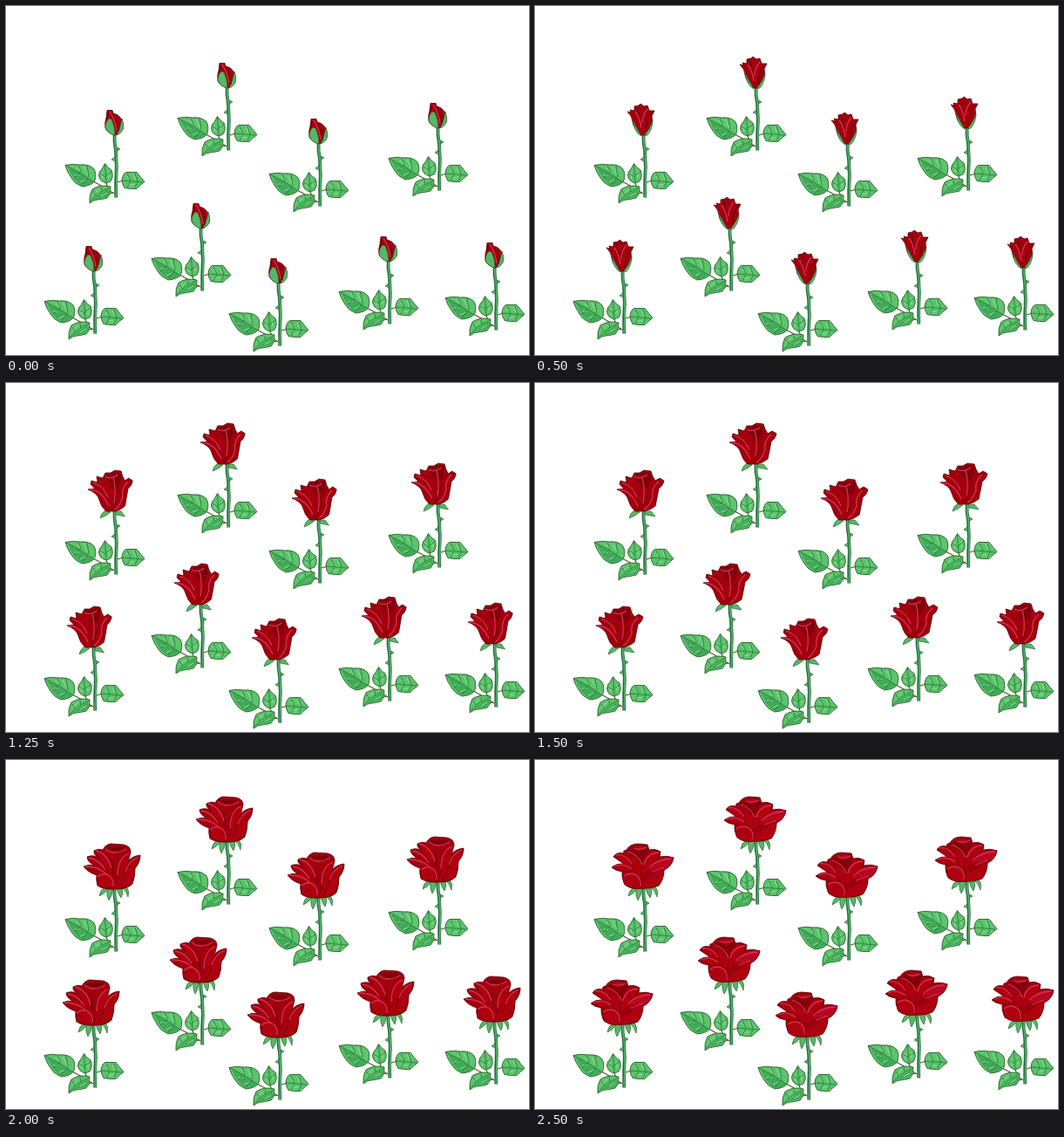
Recreate the animation shown at these times as an HTML page with a canvas. Size 600x400 px, loop 5 s.

```html
<!DOCTYPE html>
<html lang="en">
<head>
<meta charset="utf-8">
<title>Blooming roses</title>
<style>
html, body { margin: 0; width: 100%; height: 100%; overflow: hidden; background: #fff; }
canvas { display: block; width: 600px; height: 400px; }
</style>
</head>
<body>
<canvas id="stage" width="600" height="400"></canvas>
<script>
const ctx = document.getElementById('stage').getContext('2d');
const LOOP = 5000, STEP = 250;

// Plant positions relative to the top one, whose coordinates the paths use.
const PLANTS = [[0, 0], [-129, 54], [105, 64], [242, 46], [-30, 161],
  [-153, 210], [59, 224], [185, 199], [307, 206]];

// Each style: fill, stroke, line width.
const STYLES = {
  leaf: ['#5cc46c', '#2a5e26', 0.9],
  shade: ['#41aa58', null, 0],
  glow: [null, '#92e09a', 1],
  vein: [null, '#23743a', 0.8],
  twig: [null, '#4f5a20', 1.2],
  bark: [null, '#20683a', 3.8],
  sap: [null, '#52b46c', 1.7],
  sepal: ['#56b866', '#2a6634', 0.7],
  red: ['#a2000c', '#5a000a', 0.8],
  deep: ['#86000a', null, 0],
  petal: ['#ae000e', '#74000e', 0.7],
  rose: ['#b6081e', '#74000e', 0.7],
  pink: [null, '#d83056', 1.3],
  dark: [null, '#62000a', 1]
};

const STALK = [
  ['twig', 'M229 147Q241 153 253 161M241 163L252 160M243 147L247 156M257 148L264 146'],
  ['leaf', 'M197 128.5Q206 126.5 214 128Q225 127 230 133Q233 138 231 146Q228 152 216 153Q207 149 204 143Q199 136 197 128.5Z'],
  ['shade', 'M200 130Q215 138 229 147Q225 152 216 152Q206 146 200 130Z'],
  ['glow', 'M210 131L217 137M218 130L223 140M207 140L213 140M214 148L221 145'],
  ['vein', 'M198 129Q216 137 230 148M212 129L216 137M222 129L224 142M207 143L214 137M216 151L223 143'],
  ['leaf', 'M242.5 126.5Q245 131 250 134Q253 141 249 147L244 149Q236 147 235.5 140Q236 135 239 133Z'],
  ['glow', 'M239 137L240 144M247 136L247 143'],
  ['vein', 'M242.5 128L244 148M237 138L243 142M250 136L244 140'],
  ['leaf', 'M225 172Q224 163 228 156Q237 150 249 153Q249 162 245 166Q237 168 234 168Q230 168 225 172Z'],
  ['shade', 'M227 169L247 155Q248 162 244 165Q234 166 227 169Z'],
  ['glow', 'M229 162L236 156M238 164L245 160'],
  ['vein', 'M226 170Q233 161 248 154M229 158L232 163M238 154L239 159'],
  ['leaf', 'M262 145Q263 138 267 136.5L279 136.5Q284 143 288 147.5Q283 151 279 155.5Q271 156 265 154.5Q262 150 262 145Z'],
  ['glow', 'M267 141L271 144M275 139L278 145M269 151L276 151'],
  ['vein', 'M262 146L286 148M268 138L272 146M277 138L280 147M268 154L272 147M277 154L280 148'],
  ['bark', 'M253.5 92Q253 102 255 112Q256.5 130 255.2 147L255.2 165.5'],
  ['sap', 'M253.7 93Q253.3 102 255.3 112Q256.8 130 255.3 165'],
  ['sepal', 'M256.5 108L260 110L256.5 112ZM254 119L250 122L254.5 124Z']
];

const BUD = [
  ['red', 'M245 65.5L251 65.5L252 69Q258 70 261 75Q264 80 263 87Q260 93 254 94Q246 92 243 86Q242 79 244 74Z'],
  ['sepal', 'M247 75Q243 79 243 85Q245 92 254 94Q254 84 250 76Z'],
  ['sepal', 'M262 75Q265 82 263 88Q260 93 256 94Q260 87 262 75Z'],
  ['pink', 'M248 67Q254 76 256 89'],
  ['dark', 'M252 70Q259 79 258 90M246 68L245 75']
];

const OPENING = [
  ['red', 'M235 67L239 68L238 65L243 66L243 61L248 60L250 58L254 61L258 60L260 66L266 66L263 72Q265 80 261 87L256 94L250 94Q242 86 241 79Q241 73 235 67Z'],
  ['sepal', 'M241 77Q246 87 251 95Q243 91 241 77Z'],
  ['sepal', 'M264 77Q264 87 258 94L254 95Q261 87 264 77Z'],
  ['dark', 'M247 62Q247 70 250 76M262 68Q257 75 256 90'],
  ['pink', 'M244 67Q249 73 251 86M258 64Q252 71 252 80']
];

const CUP = [
  ['sepal', 'M233 87Q240 86 250 94Q240 96 233 87Z'],
  ['sepal', 'M271 84Q264 86 255 94Q265 95 271 84Z'],
  ['red', 'M225 67L237 69L240 64L237 60L241 57L246 59L250 57L258 56L261 60L266 57L270 58L271 62Q265 68 265 76L264 88Q257 92 250 93Q243 92 238 88Q239 78 238 73L232 70Z'],
  ['deep', 'M241 60Q249 66 257 58L260 66Q256 79 252 91Q246 79 241 60Z'],
  ['dark', 'M240 75Q242 85 247 91M263 67Q258 78 260 90'],
  ['pink', 'M226 67.5L238 71M243 60Q250 68 257 60M249 68Q253 77 251 89M262 62Q259 68 261 77']
];

const HALF = [
  ['sepal', 'M243 92Q238 95 237 101Q243 99 249 94Z'],
  ['sepal', 'M255 93L262 93L267 99L256 97Z'],
  ['red', 'M223 68L231 67L226 62L227 58L234 60L233 53L240 55L243 49L249 49L254 46L262 47L264 53L267 58L272 55L277 58Q276 64 271 67Q269 78 267 87Q261 92 254 93L244 93Q238 88 236 80Q234 72 223 68Z'],
  ['deep', 'M243 51L254 48L262 49Q263 60 256 69Q247 63 243 51Z'],
  ['dark', 'M250 50Q256 54 255 62M258 49L261 58M259 70Q256 82 250 92'],
  ['pink', 'M225 68Q239 69 247 87M229 60Q241 64 246 77M252 54Q256 68 253 84M271 59Q262 66 264 77Q260 88 254 91M243 53Q249 57 258 51']
];

const CALYX = [
  ['sepal', 'M242 92Q237 95 236 102Q241 100 246 94Z'],
  ['sepal', 'M246 92Q243 99 247 107Q251 101 252 93Z'],
  ['sepal', 'M256 92Q257 99 261 104Q264 98 262 92Z'],
  ['sepal', 'M262 92Q267 96 269 103Q271 96 267 91Z']
];

const OPEN = [
  ...CALYX,
  ['red', 'M218 68Q224 65 230 67Q222 62 222 57Q229 54 235 58Q229 54 230 50Q235 47 240 49Q243 43 249 42L264 43Q272 45 272 51Q270 56 269 62Q274 56 283 55Q283 64 277 70Q277 81 274 88Q268 94 256 94Q241 95 234 90Q232 83 233 78Q223 75 218 68Z'],
  ['petal', 'M231 50Q241 50 247 59Q251 66 251 76Q239 68 231 50Z'],
  ['petal', 'M256 88Q254 67 262 56Q269 49 272 51Q269 66 265 74Z'],
  ['petal', 'M254 93Q257 80 265 73Q268 61 282 56Q282 64 277 70Q276 82 273 88Q264 94 254 93Z'],
  ['petal', 'M234 80Q241 74 248 79Q254 86 252 93Q240 94 234 89Z'],
  ['deep', 'M243 47Q250 44 264 45Q267 49 261 52Q251 54 243 47Z'],
  ['dark', 'M247 46Q255 51 262 46M250 60Q254 68 252 78M266 74Q264 84 259 91'],
  ['pink', 'M220 68Q236 68 244 77M224 58Q236 60 243 72M232 50Q245 53 250 70M243 48Q253 56 267 48M270 53Q257 58 257 78M281 57Q269 62 266 74M234 80Q241 74 248 79Q253 84 252 91']
];

const FULL = [
  ...CALYX,
  ['red', 'M217 69Q223 64 231 65L219 57Q222 51 231 53Q229 50 234 49Q238 42 247 42L258 43L260 49Q267 47 273 51L272 57Q280 55 288 58Q286 68 277 72Q276 84 271 90Q262 94 252 93Q240 95 232 89Q228 81 229 74Q221 73 217 69Z'],
  ['petal', 'M220 56Q230 52 239 62Q245 68 246 76Q236 71 231 65Z'],
  ['petal', 'M218 69Q228 62 238 69Q244 73 246 79Q238 72 229 74Z'],
  ['deep', 'M236 49Q243 45 256 45L260 51Q257 62 253 68Q241 64 236 49Z'],
  ['rose', 'M242 47Q249 42 257 46Q254 52 249 52Q246 49 242 47Z'],
  ['petal', 'M238 53Q246 57 251 65L251 81Q239 72 238 53Z'],
  ['petal', 'M251 81Q249 63 259 51Q266 48 272 52Q269 65 260 72Z'],
  ['rose', 'M257 75Q262 62 273 58Q280 55 288 58Q286 68 277 72Q268 69 257 75Z'],
  ['petal', 'M250 93Q251 82 262 75Q271 69 277 72Q277 84 270 90Q260 94 250 93Z'],
  ['petal', 'M230 79Q238 72 247 78Q254 85 250 93Q238 95 231 87Z'],
  ['dark', 'M248 48Q250 52 257 48M244 57Q249 60 252 66M256 83Q260 78 267 76'],
  ['pink', 'M222 55Q232 53 240 65M220 68Q230 63 240 71M236 51Q248 55 252 66M242 47Q250 50 257 46M254 66Q257 53 271 52M260 69Q269 60 285 59M263 74L277 69M231 79Q239 73 247 79Q251 84 250 91']
];

// Scales a flower sideways (left and right apart) and upward around its base.
const warp = (layers, left, right, tall) => layers.map(([style, path]) => [style,
  path.replace(/([\d.]+) ([\d.]+)/g, (_, x, y) =>
    (254 + (x - 254) * (x < 254 ? left : right)) + ' ' + (93 + (y - 93) * tall))]);

const compile = layers => layers.map(([style, path]) => [STYLES[style], new Path2D(path)]);

const stalk = compile(STALK);
const stages = [
  BUD,
  warp(OPENING, 0.82, 0.85, 0.92),
  OPENING,
  warp(CUP, 0.86, 0.88, 0.97),
  CUP,
  warp(HALF, 1, 0.88, 1),
  HALF,
  warp(OPEN, 0.94, 0.9, 0.96),
  OPEN,
  warp(FULL, 1, 0.92, 1),
  FULL
].map(compile);

function paint(layers) {
  for (const [[fill, stroke, width], path] of layers) {
    if (fill) {
      ctx.fillStyle = fill;
      ctx.fill(path);
    }
    if (stroke) {
      ctx.strokeStyle = stroke;
      ctx.lineWidth = width;
      ctx.stroke(path);
    }
  }
}

function draw(time) {
  const index = Math.min(Math.floor(time / STEP), stages.length - 1);
  ctx.fillStyle = '#fff';
  ctx.fillRect(0, 0, 600, 400);
  ctx.lineJoin = 'round';
  for (const [x, y] of PLANTS) {
    ctx.save();
    ctx.translate(x, y);
    paint(stalk);
    paint(stages[index]);
    ctx.restore();
  }
}

const start = performance.now();
function tick() {
  draw((performance.now() - start) % LOOP);
  requestAnimationFrame(tick);
}
tick();
</script>
</body>
</html>
```
